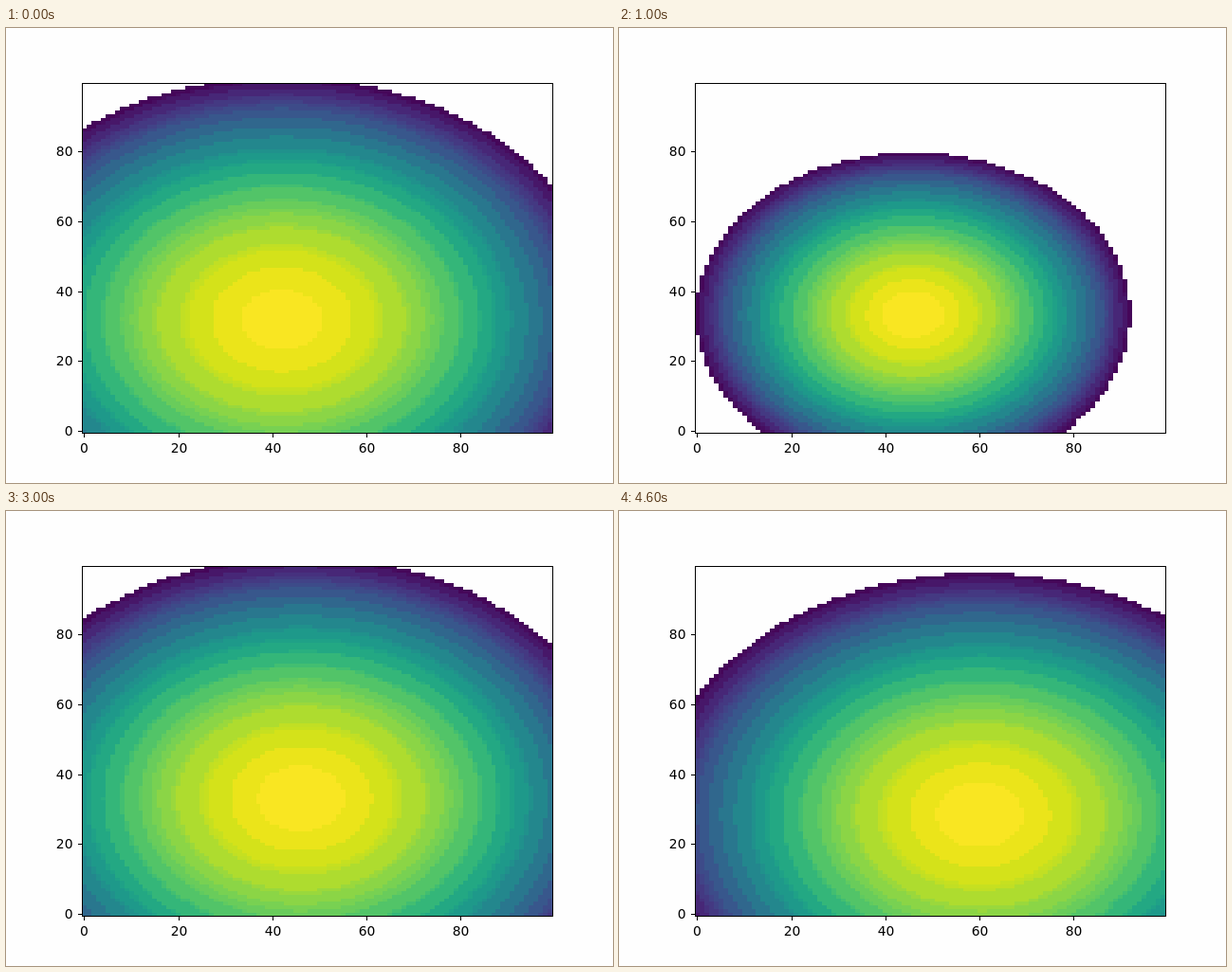
Write an HTML page with a canvas that moves like this. It is 640 by 480 pixels and loops after 5 s.

```html
<!DOCTYPE html>
<html lang="en">
<head>
<meta charset="utf-8">
<title>Heat map</title>
<style>
  html, body { margin: 0; width: 100%; height: 100%; overflow: hidden; background: #fefefe; }
  canvas, svg { position: absolute; left: 0; top: 0; width: 640px; height: 480px; }
  text { font: 13.89px "DejaVu Sans", sans-serif; fill: #000; }
</style>
</head>
<body>
<canvas id="field" width="640" height="480"></canvas>
<svg id="axes" viewBox="0 0 640 480" shape-rendering="crispEdges">
  <rect x="80.5" y="58.5" width="496" height="369" fill="none" stroke="#000"/>
</svg>
<script>
const CELLS = 100, STEP_MS = 1000;
const LEFT = 80, BOTTOM = 427.2, CELL_W = 4.96, CELL_H = 3.696;

// Lowest level (0-255) of each colour band, brightest first.
const BANDS = [
  [252, '#f9e622'], [244, '#ebe41a'], [235, '#d4e21a'], [233, '#c6e020'],
  [231, '#c1df24'], [219, '#aedc2f'], [216, '#9ad83c'], [207, '#8bd546'],
  [201, '#78d152'], [194, '#69cc5b'], [193, '#60ca60'], [180, '#52c468'],
  [177, '#42be71'], [162, '#34b679'], [161, '#29af7f'], [148, '#23a883'],
  [144, '#1fa187'], [132, '#1e998a'], [127, '#20918c'], [110, '#23878d'],
  [93, '#29778e'], [77, '#30678d'], [62, '#38578c'], [54, '#3d4b89'],
  [48, '#414387'], [38, '#443982'], [35, '#46317e'], [22, '#472777'],
  [10, '#471769'], [8, '#470d60'], [0, '#450659']
];

// Centre, squared radius and radius of the brightest core, in cells.
const STEPS = [
  { cx: 42,   cy: 31.85, r2: 4776, core: 8.6 },
  { cx: 45.9, cy: 33.27, r2: 2142, core: 6.6 },
  { cx: 48.9, cy: 30.5,  r2: 3339, core: 8.3 },
  { cx: 46.1, cy: 33,    r2: 4777, core: 9.3 },
  { cx: 60.1, cy: 28.3,  r2: 4776, core: 9.3 }
];

const ctx = document.getElementById('field').getContext('2d');
const axes = document.getElementById('axes');
const edgeX = col => Math.round(LEFT + col * CELL_W);
const edgeY = row => Math.round(BOTTOM - row * CELL_H);

function colorAt(d2, { r2, core }) {
  if (d2 >= r2) return null;
  if (d2 < core * core) return BANDS[0][1];
  const level = 256 * (1 - d2 / r2);
  return BANDS.find(([min], i) => i > 0 && level >= min)[1];
}

function drawField(step) {
  ctx.clearRect(0, 0, 640, 480);
  for (let row = 0; row < CELLS; row++) {
    const top = edgeY(row + 1), height = edgeY(row) - top;
    for (let col = 0; col < CELLS; col++) {
      const color = colorAt((col - step.cx) ** 2 + (row - step.cy) ** 2, step);
      if (!color) continue;
      const x = edgeX(col);
      ctx.fillStyle = color;
      ctx.fillRect(x, top, edgeX(col + 1) - x, height);
    }
  }
}

function add(tag, attrs, label = '') {
  const node = document.createElementNS('http://www.w3.org/2000/svg', tag);
  for (const key in attrs) node.setAttribute(key, attrs[key]);
  node.textContent = label;
  axes.append(node);
}

for (let v = 0; v <= 80; v += 20) {
  const x = Math.round(LEFT + (v + 0.5) * CELL_W);
  const y = Math.round(BOTTOM - (v + 0.5) * CELL_H);
  add('rect', { x, y: 428, width: 1, height: 4 });
  add('rect', { x: 76, y, width: 4, height: 1 });
  add('text', { x: x + 0.5, y: 448, 'text-anchor': 'middle' }, v);
  add('text', { x: 70.5, y: y + 5, 'text-anchor': 'end' }, v);
}

let shown = -1;
const start = performance.now();
function tick() {
  const index = Math.floor((performance.now() - start) / STEP_MS) % STEPS.length;
  if (index !== shown) drawField(STEPS[shown = index]);
  requestAnimationFrame(tick);
}
tick();
</script>
</body>
</html>
```
